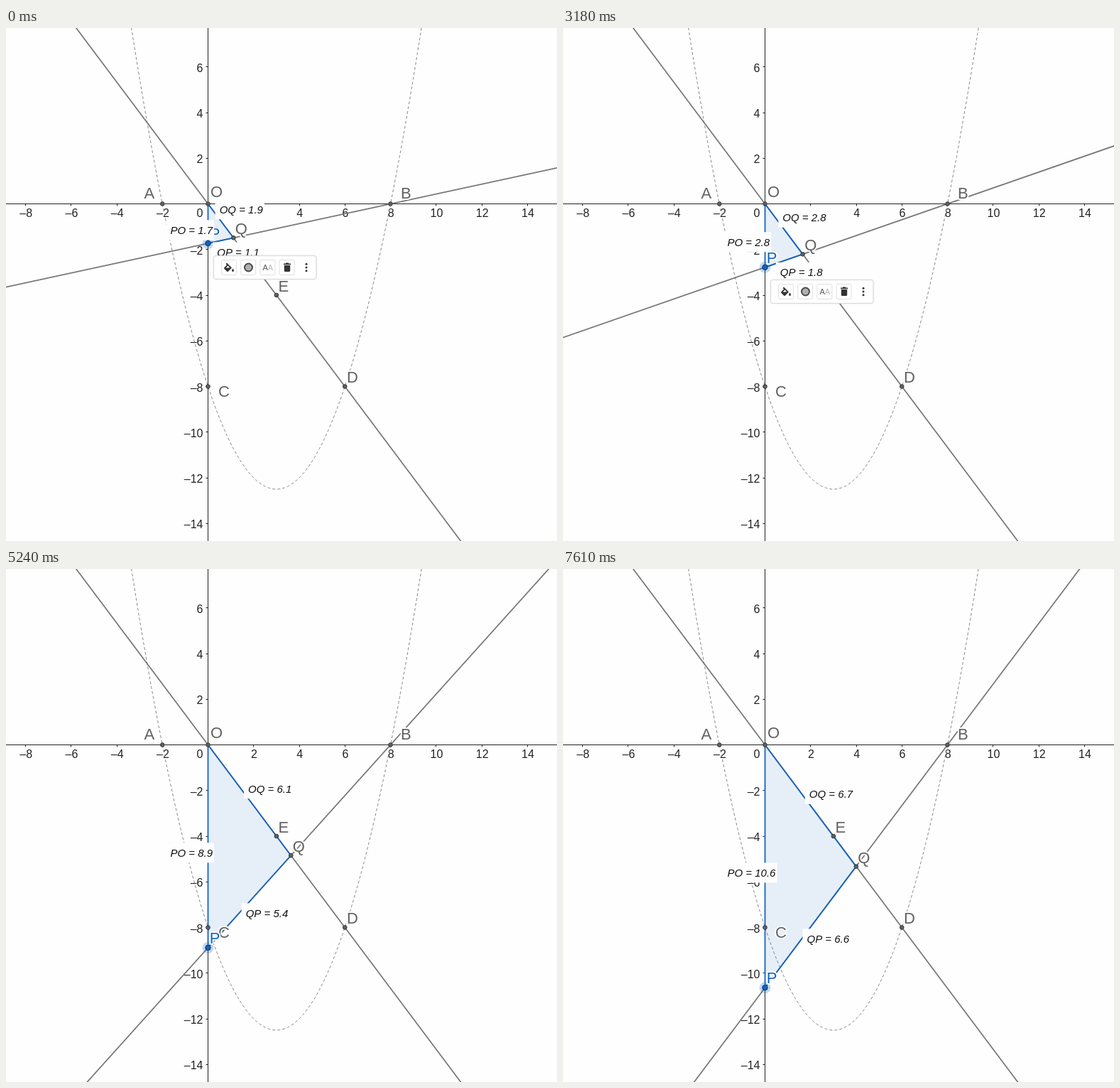
Write an HTML page with a canvas that moves like this. It is 776 by 722 pixels and loops after 7.99 s.

```html
<!DOCTYPE html>
<html lang="en">
<head>
<meta charset="utf-8">
<title>Triangle on two lines</title>
<style>
  html, body { margin: 0; width: 100%; height: 100%; overflow: hidden; background: #fefefe; }
  canvas { display: block; }
</style>
</head>
<body>
<canvas id="stage" width="776" height="722"></canvas>
<script>
const ctx = document.getElementById('stage').getContext('2d');
const W = 776, H = 722, LOOP = 7990;
const UNIT = 32.125, OX = 284.5, OY = 247.5;
const PAPER = '#fefefe', GREY = '#616161', LINE = '#757575', BLUE = '#1565c0';
const SANS = '"Liberation Sans", Arial, sans-serif';

// [time, length of PO]: the drag is sampled, so every value holds until the next
const DRAG = [
  [0, 1.73], [370, 1.86], [480, 2],
  [980, 2.15], [1100, 2.4], [1220, 2.677], [1330, 2.8], [1450, 2.9], [1570, 2.976],
  [2120, 2.86], [2200, 2.73], [2550, 2.75], [2680, 2.78],
  [3660, 2.82], [3780, 2.95], [3900, 3.15], [4020, 3.4], [4150, 3.7], [4270, 4], [4380, 4.77],
  [4510, 5.3], [4620, 5.95], [4750, 6.65], [4870, 7.35], [5000, 8], [5120, 8.5], [5240, 8.887],
  [5350, 9.15], [5470, 9.45], [5580, 9.75], [5700, 10],
  [6780, 10.2], [6890, 10.4],
  [7130, 10.44], [7250, 10.5], [7370, 10.55], [7490, 10.6], [7610, 10.64]
];
const TOOLBAR = [[0, 370], [3180, 3660], [5810, 6040]];

const toScreen = (x, y) => ({ x: OX + x * UNIT, y: OY - y * UNIT });
const middle = (a, b) => ({ x: (a.x + b.x) / 2, y: (a.y + b.y) / 2 });
const measure = (a, b) => +(Math.hypot(a.x - b.x, a.y - b.y) / UNIT).toFixed(1);

const O = toScreen(0, 0), A = toScreen(-2, 0), B = toScreen(8, 0);
const C = toScreen(0, -8), D = toScreen(6, -8), E = toScreen(3, -4);

function trace(points, close) {
  ctx.beginPath();
  for (const p of points) ctx.lineTo(p.x, p.y);
  if (close) ctx.closePath();
}

function stroke(points, color, width) {
  trace(points);
  ctx.strokeStyle = color;
  ctx.lineWidth = width;
  ctx.stroke();
}

function disc(x, y, r, fill, edge, width = 1) {
  ctx.beginPath();
  ctx.arc(x, y, r, 0, 7);
  ctx.fillStyle = fill;
  ctx.fill();
  if (!edge) return;
  ctx.strokeStyle = edge;
  ctx.lineWidth = width;
  ctx.stroke();
}

function panel(x, y, w, h, r, edge) {
  ctx.beginPath();
  ctx.roundRect(x, y, w, h, r);
  ctx.fillStyle = '#fff';
  ctx.fill();
  ctx.strokeStyle = edge;
  ctx.lineWidth = 1;
  ctx.stroke();
}

function haloText(text, x, y, size, color, align = 'left', halo = 4) {
  ctx.font = `${size}px ${SANS}`;
  ctx.textAlign = align;
  ctx.lineJoin = 'round';
  ctx.strokeStyle = PAPER;
  ctx.lineWidth = halo;
  ctx.strokeText(text, x, y);
  ctx.fillStyle = color;
  ctx.fillText(text, x, y);
}

function drawAxes() {
  stroke([{ x: 0, y: OY }, { x: W, y: OY }], '#222', 1);
  stroke([{ x: OX, y: 0 }, { x: OX, y: H }], '#222', 1);
  const number = n => (n < 0 ? '–' : '') + Math.abs(n);
  for (let n = -14; n <= 14; n += 2) {
    if (!n) continue;
    const p = toScreen(n, n);
    if (n >= -8) {
      const x = Math.floor(p.x) + 0.5;
      stroke([{ x, y: OY }, { x, y: OY + 3 }], '#222', 1);
      haloText(number(n), p.x + 0.7, 266, 16, '#222', 'center', 3);
    }
    if (n <= 6) {
      const y = Math.floor(p.y) + 0.5;
      stroke([{ x: OX - 3, y }, { x: OX, y }], '#222', 1);
      haloText(number(n), 277.5, p.y + 7, 16, '#222', 'right', 3);
    }
  }
  haloText('0', 277.5, 266, 16, '#222', 'right', 3);
}

function drawParabola() {
  const points = [];
  for (let x = -3.36; x < 9.4; x += 0.04) points.push(toScreen(x, (x + 2) * (x - 8) / 2));
  ctx.setLineDash([4, 3]);
  stroke(points, '#858585', 1);
  ctx.setLineDash([]);
}

function drawMeasure(text, x, baseline) {
  ctx.font = `italic 15px ${SANS}`;
  ctx.textAlign = 'left';
  ctx.fillStyle = PAPER;
  ctx.fillRect(x - 6, baseline - 19.5, ctx.measureText(text).width + 8, 28);
  ctx.fillStyle = '#111';
  ctx.fillText(text, x, baseline);
}

function drawBucket(x, y) {
  ctx.save();
  ctx.translate(x, y);
  ctx.fillStyle = '#333';
  ctx.fill(new Path2D('M-3-6.5l7 7-5 5q-1 1-2 0l-3.5-3.5q-1-1 0-2l3.5-3.5-1.5-1.5zM-1.5-2.5l-3 3h6z'));
  ctx.fill(new Path2D('M5.5 1.5q3 4 0 4.4q-3-.4 0-4.4z'));
  ctx.restore();
}

function drawBin(x, y) {
  ctx.fillStyle = '#333';
  ctx.fillRect(x - 5, y - 5.5, 10, 1.7);
  ctx.fillRect(x - 2, y - 6.5, 4, 1.5);
  ctx.beginPath();
  ctx.roundRect(x - 4.2, y - 3, 8.4, 9, [0, 0, 1.5, 1.5]);
  ctx.fill();
}

function drawToolbar(p) {
  const top = Math.round(p.y + 16.8) + 0.5, y = top + 16.5;
  ctx.save();
  ctx.shadowColor = 'rgba(0,0,0,.1)';
  ctx.shadowBlur = 2;
  panel(292.5, top, 144.5, 33, 3, '#dcdcdc');
  ctx.restore();
  for (let i = 0; i < 4; i++) panel(303.5 + i * 27.2, y - 10.5, 21, 21, 2, '#e0e0e0');
  drawBucket(314, y);
  disc(341.5, y, 5.5, '#b0b0b0', '#4a4a4a', 2);
  ctx.font = `11px ${SANS}`;
  ctx.textAlign = 'left';
  ctx.fillStyle = '#555';
  ctx.fillText('A', 361.5, y + 4);
  ctx.fillStyle = '#b5b5b5';
  ctx.fillText('A', 368.8, y + 4);
  drawBin(396, y);
  for (const dy of [-4.7, 0, 4.7]) disc(423, y + dy, 1.5, '#333');
}

function draw(t) {
  const length = DRAG.findLast(([start]) => t >= start)[1];
  const qx = length / (length / 8 + 4 / 3);
  const P = toScreen(0, -length), Q = toScreen(qx, -4 / 3 * qx);

  ctx.fillStyle = PAPER;
  ctx.fillRect(0, 0, W, H);
  drawAxes();
  drawParabola();

  trace([O, Q, P], true);
  ctx.fillStyle = 'rgba(21,101,192,.1)';
  ctx.fill();
  stroke([toScreen(-9, 12), toScreen(15, -20)], LINE, 1.7);
  stroke([toScreen(-9, -17 * length / 8), toScreen(16, length)], LINE, 1.7);
  trace([O, Q, P], true);
  ctx.strokeStyle = BLUE;
  ctx.lineWidth = 1.8;
  ctx.stroke();

  for (const p of [O, A, B, C, D, E, Q]) disc(p.x, p.y, 2.8, GREY, '#333');
  disc(P.x, P.y, 8, 'rgba(21,101,192,.25)');
  disc(P.x, P.y, 3.7, BLUE, '#0b2c55');

  const names = [
    ['A', 194.5, 239.5], ['O', 288, 237.5], ['B', 556, 239.5], ['C', 299, 518.5],
    ['D', 480, 499], ['E', 383.5, 371], ['Q', Q.x + 2.5, Q.y - 5]
  ];
  for (const [name, x, y] of names) haloText(name, x, y, 22, GREY);
  haloText('P', P.x + 2.3, P.y - 6, 22, BLUE);

  const oq = middle(O, Q), qp = middle(Q, P), po = middle(P, O);
  drawMeasure('OQ = ' + measure(O, Q), oq.x - 1.8, oq.y - 10.7);
  drawMeasure('QP = ' + measure(Q, P), qp.x - 5.2, qp.y + 21.8);
  drawMeasure('PO = ' + measure(P, O), 231.5, po.y + 14.6);

  if (TOOLBAR.some(([from, to]) => t >= from && t < to)) drawToolbar(P);
}

const begin = performance.now();
function tick() {
  draw((performance.now() - begin) % LOOP);
  requestAnimationFrame(tick);
}
tick();
</script>
</body>
</html>
```
